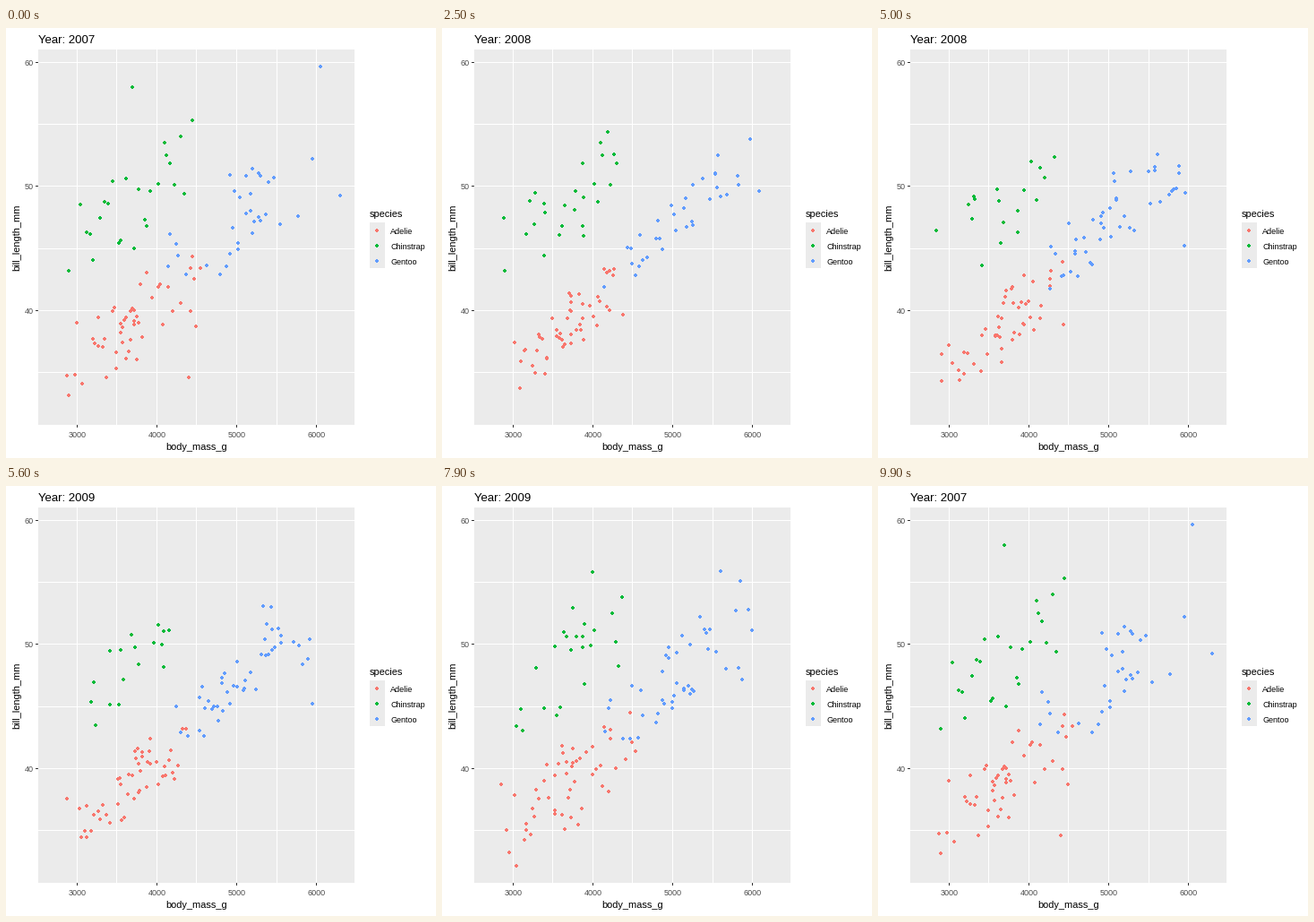
Animation, 480 px wide and 480 px high, one loop 10 s. Source, as a matplotlib script:

```python
import numpy as np
import matplotlib.pyplot as plt
from matplotlib.animation import FuncAnimation
from matplotlib.collections import PolyCollection
from matplotlib.patches import Rectangle

SIZE, DPI = 480, 80
LEFT, RIGHT, TOP, BOTTOM = 36, 389, 24, 443
MASS_LIM = (2520, 6480)
BILL_LIM = (30.725, 60.975)
YEARS = (2007, 2008, 2009)
FRAMES = 100
CYCLE = FRAMES / len(YEARS)

# colour, birds per year, mean mass and bill, spread of mass and bill
SPECIES = {
    "Adelie": ("#F8766D", (50, 50, 52), (3700, 38.8), (455, 2.6)),
    "Gentoo": ("#619CFF", (34, 46, 44), (5075, 47.4), (505, 2.8)),
    "Chinstrap": ("#00BA38", (26, 18, 24), (3735, 48.8), (385, 3.0)),
}
# species, year, row, mass, bill
OUTLIERS = (
    ("Adelie", 2007, 15, 4400, 34.6),
    ("Adelie", 2009, 43, 3050, 32.1),
    ("Gentoo", 2007, 18, 6300, 49.2),
    ("Gentoo", 2007, 34, 6050, 59.6),
    ("Gentoo", 2008, 46, 5950, 45.2),
    ("Gentoo", 2009, 22, 5600, 55.9),
    ("Gentoo", 2009, 36, 5850, 55.1),
    ("Chinstrap", 2007, 18, 3700, 58.0),
    ("Chinstrap", 2007, 23, 2900, 43.2),
    ("Chinstrap", 2008, 13, 2700, 46.9),
    ("Chinstrap", 2009, 20, 4000, 55.8),
)


def sample(n, mean, spread, rng):
    """Rows of (mass, bill); females and males take turns, males are larger."""
    z = np.linspace(-1.65, 1.65, n)
    a, b = rng.permutation(z), rng.permutation(z)
    sex = np.arange(n) % 2 * 2 - 1
    mass = mean[0] + spread[0] * (0.7 * sex + 0.7 * a)
    bill = mean[1] + spread[1] * (0.6 * sex + 0.3 * a + 0.7 * b)
    return np.column_stack([np.round(mass / 25) * 25, np.round(bill, 1)])


rng = np.random.default_rng(7)
BIRDS = {name: [sample(n, mean, spread, rng) for n in counts]
         for name, (_, counts, mean, spread) in SPECIES.items()}
for name, year, row, *point in OUTLIERS:
    BIRDS[name][YEARS.index(year)][row - 1] = point


def px(mass):
    return LEFT - 0.05 + (mass - MASS_LIM[0]) / np.ptp(MASS_LIM) * (RIGHT - LEFT)


def py(bill):
    return BOTTOM + 0.3 - (bill - BILL_LIM[0]) / np.ptp(BILL_LIM) * (BOTTOM - TOP)


def snap(v):
    return np.floor(np.asarray(v) + 0.5)


# outline of a four pixel dot without its corners
CORNER = np.array([(1, 2), (1, 1), (2, 1)])
TURN = np.array([(0, -1), (1, 0)])
DOT = np.vstack([CORNER @ np.linalg.matrix_power(TURN, k) for k in range(4)])


def dots(x, y):
    return snap(np.column_stack([x, y]))[:, None, :] + DOT


fig = plt.figure(figsize=(SIZE / DPI, SIZE / DPI), dpi=DPI, facecolor="white")
ax = fig.add_axes([0, 0, 1, 1])
ax.set(xlim=(0, SIZE), ylim=(SIZE, 0))
ax.axis("off")


def rect(x, y, w, h, color):
    ax.add_patch(Rectangle((x, y), w, h, facecolor=color, linewidth=0, zorder=1))


def label(x, y, text, size, color="black", **kw):
    return ax.text(x, y, text, fontsize=size * 72 / DPI, color=color,
                   family="Liberation Sans", va="baseline", **kw)


rect(LEFT, TOP, RIGHT - LEFT, BOTTOM - TOP, "#EBEBEB")
for mass in range(3000, 6001, 500):
    x = snap(px(mass))
    rect(x, TOP, 1, BOTTOM - TOP, "white")
    if mass % 1000 == 0:
        rect(x, BOTTOM, 1, 3, "#333333")
        label(x + 0.5, 457, str(mass), 9, "#4D4D4D", ha="center")
for bill in range(35, 61, 5):
    y = snap(py(bill))
    rect(LEFT, y, RIGHT - LEFT, 1, "white")
    if bill % 10 == 0:
        rect(LEFT - 3, y, 3, 1, "#333333")
        label(31, y + 4, str(bill), 9, "#4D4D4D", ha="right")

label(212.5, 471, "body_mass_g", 11, ha="center")
label(15, 233.5, "bill_length_mm", 11, ha="center", rotation=90,
      rotation_mode="anchor")
title = label(36, 17, "", 13.2)

label(406, 211, "species", 11)
rect(406, 217, 17, 51, "#EBEBEB")
for i, name in enumerate(sorted(SPECIES)):
    y = 226 + 17 * i
    ax.add_collection(PolyCollection(dots([414], [y]), linewidths=0, snap=False,
                                     facecolors=SPECIES[name][0], zorder=3))
    label(429, y + 4, name, 9)

cloud = PolyCollection([], linewidths=0, snap=False, zorder=3)
ax.add_collection(cloud)


def between(old, new, p):
    """Shared rows glide; leaving rows wait and new rows appear at the end."""
    if p <= 0 or p >= 1:
        return new if p >= 1 else old
    k = min(len(old), len(new))
    t = 0.5 - 0.5 * np.cos(np.pi * p)
    return np.vstack([old[:k] + t * (new[:k] - old[:k]), old[k:]])


def draw(frame):
    # each year rests for a third of its cycle, then moves to the next
    year = min(int(frame / 33), 2)
    following = (year + 1) % 3
    start, end = round((year + 1 / 3) * CYCLE), 33 * (year + 1)
    p = (frame - start) / (end - start)
    verts, colors = [], []
    for name, (color, *_) in SPECIES.items():
        birds = between(BIRDS[name][year], BIRDS[name][following], p)
        verts.extend(dots(px(birds[:, 0]), py(birds[:, 1])))
        colors += [color] * len(birds)
    cloud.set_verts(verts)
    cloud.set_facecolor(colors)
    shown = following if frame >= start + 12 else year
    title.set_text(f"Year: {YEARS[shown]}")
    return cloud, title


anim = FuncAnimation(fig, draw, frames=FRAMES, interval=100,
                     repeat=True, repeat_delay=0, blit=False)
plt.show()
```
